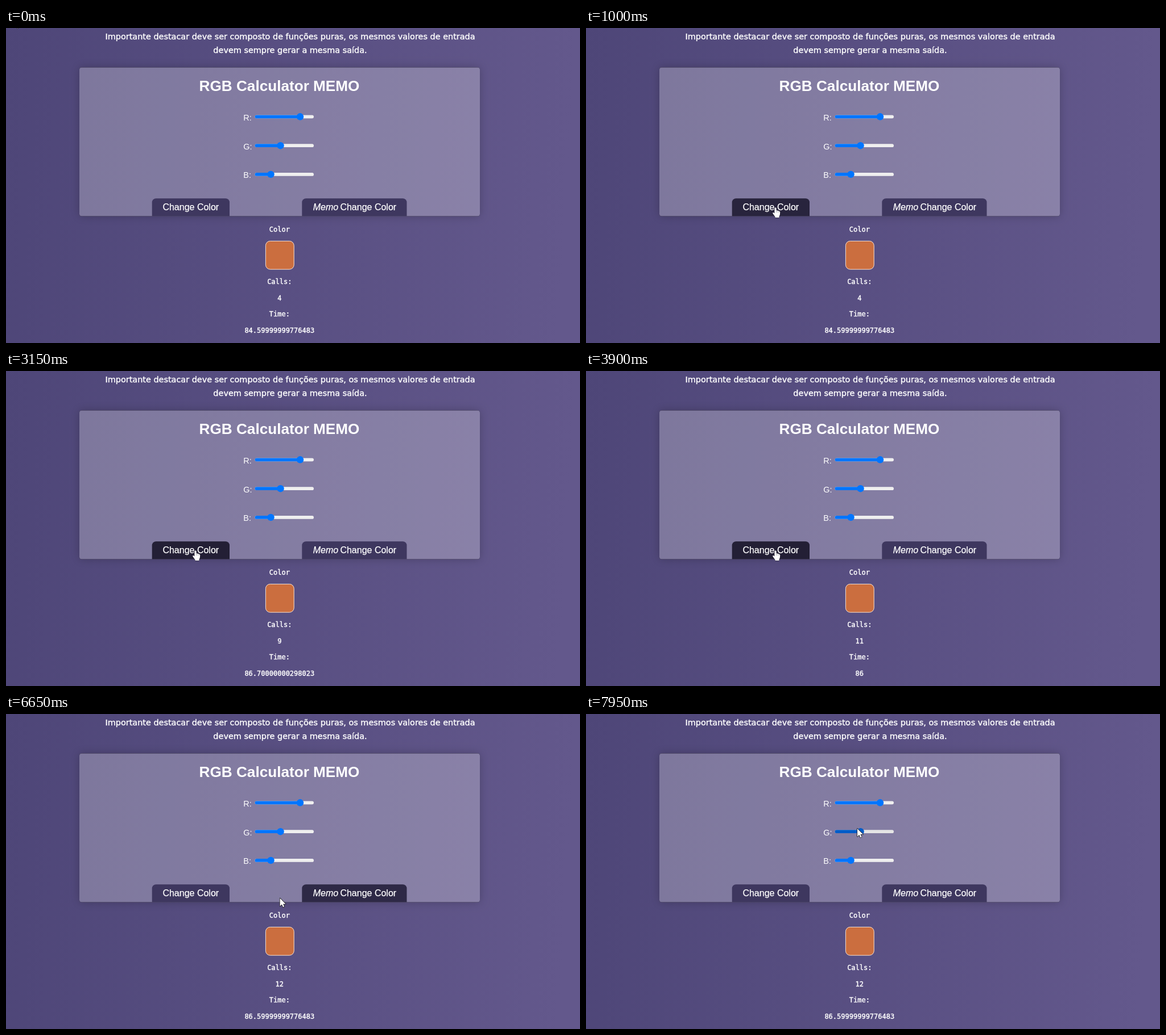
Animation of 1009x555 px, one loop 8 s. Source, as an HTML page with a canvas:

```html
<!DOCTYPE html>
<html lang="pt">
<head>
<meta charset="utf-8">
<title>RGB Calculator MEMO</title>
<style>
  html, body { margin: 0; width: 100%; height: 100%; overflow: hidden; background: #584e82; }
  canvas { display: block; }
</style>
</head>
<body>
<canvas id="stage" width="1009" height="555"></canvas>
<script>
const W = 1009, H = 555, LOOP = 8000, STEP = 50;
const ctx = document.getElementById('stage').getContext('2d');

const SANS = '"Liberation Sans", Arial, sans-serif';
const WIDE = '"DejaVu Sans", Verdana, sans-serif';
const MONO = '"DejaVu Sans Mono", monospace';

// Pointer stops: arrival time, x, y and how long it rests there
const STOPS = [
  { at: 0, x: 14.5, y: -15 },
  { at: 450, x: 452, y: 206 },
  { at: 500, x: 293, y: 245 },
  { at: 850, x: 332, y: 304 },
  { at: 950, x: 333, y: 316, rest: 3175 },
  { at: 4650, x: 582, y: 308, rest: 1775 },
  { at: 6650, x: 481.6, y: 324.6 },
  { at: 6850, x: 350, y: 318, rest: 275 },
  { at: 7350, x: 540, y: 322 },
  { at: 7550, x: 505, y: 347 },
  { at: 7950, x: 477, y: 202 }
];

// Each click adds one call and shows the next elapsed time
const CLICKS = [1500, 2000, 2400, 2700, 3150, 3550, 3900, 4950];
const ELAPSED = ['84.59999999776483', '85.9', '86.5', '85.40000000596046', '87.1',
  '86.70000000298023', '85.90000000596046', '86', '86.59999999776483'];

const BUTTONS = [{ x: 256.7, w: 136.3 }, { x: 520.3, w: 184.2 }];
const SLIDERS = [
  { label: 'R:', y: 156.3, thumb: 517 },
  { label: 'G:', y: 207.2, thumb: 482.5 },
  { label: 'B:', y: 257.9, thumb: 465.5 }
];
const TRACK = { x: 437.5, w: 103.5, h: 5.8 };
const BUTTON_TOP = 300.3, CARD_END = 331.5;

const ARROW = new Path2D('M0 0V14L3.3 10.9L5.4 15.7L7.6 14.7L5.5 10.1H10Z');
const HAND = new Path2D('M-1.6 1.5Q0 -1 1.6 1.5V5.5Q3 4.6 4 6Q5.3 5.2 6.3 6.8Q8 6.3 8.2 8.2' +
  'L8 12Q7.6 14.5 6.5 16V18H-.5V16.5Q-3 13.5 -4.8 10.6Q-5 8.6 -3 9.2L-1.6 10.6Z');

const clamp = v => Math.max(0, Math.min(1, v));
const easeOut = k => 1 - (1 - k) ** 2;
const lerp = (a, b, k) => a + (b - a) * k;
const mix = (a, b, k) => `rgb(${a.map((v, i) => Math.round(lerp(v, b[i], k)))})`;

function pointer(t) {
  const i = STOPS.findLastIndex(s => s.at <= t);
  const a = STOPS[Math.max(0, i)], b = STOPS[i + 1] || a;
  const leave = a.at + (a.rest || 0);
  const k = easeOut(clamp((t - leave) / (b.at - leave || 1)));
  return { x: lerp(a.x, b.x, k), y: lerp(a.y, b.y, k) };
}

// The page reacts to the pointer one step late
const seen = t => pointer(Math.max(0, t - STEP));
const overButton = (p, b) =>
  p.x >= b.x && p.x <= b.x + b.w && p.y >= BUTTON_TOP && p.y <= CARD_END;
const overSlider = (p, s) =>
  p.x >= TRACK.x && p.x <= TRACK.x + TRACK.w && Math.abs(p.y - s.y) < 8;

function hoverAmount(t, button) {
  let k = 0;
  for (let s = 0; s <= t; s += STEP) {
    k = clamp(k + (overButton(seen(s), button) ? .2 : -.2));
  }
  return k;
}

function text(str, x, y, font, { align = 'left', weight = 0 } = {}) {
  ctx.font = font;
  ctx.textAlign = align;
  ctx.fillStyle = ctx.strokeStyle = '#fff';
  ctx.fillText(str, x, y);
  if (weight) {
    ctx.lineWidth = weight;
    ctx.strokeText(str, x, y);
  }
}

function box(x, y, w, h, r, fill) {
  ctx.beginPath();
  ctx.roundRect(x, y, w, h, r);
  ctx.fillStyle = fill;
  ctx.fill();
}

function background() {
  const g = ctx.createLinearGradient(0, 0, 1000, 60);
  g.addColorStop(0, 'rgb(78,70,120)');
  g.addColorStop(1, 'rgb(99,88,140)');
  ctx.fillStyle = g;
  ctx.fillRect(0, 0, W, H);
}

function card() {
  const x = 129, y = 69.6, w = 704, h = CARD_END - y;
  ctx.save();
  ctx.beginPath();
  ctx.rect(0, 0, W, H);
  ctx.roundRect(x, y, w, h, 4);
  ctx.clip('evenodd');
  ctx.shadowColor = 'rgba(0,0,0,.22)';
  ctx.shadowBlur = 16;
  box(x, y, w, h, 4, '#000');
  ctx.restore();
  box(x, y, w, h, 4, 'rgba(255,255,255,.26)');
}

function slider(s, p) {
  const { x, w, h } = TRACK, r = h / 2, top = s.y - r;
  const hot = overSlider(p, s);
  const thumbHot = hot && Math.abs(p.x - s.thumb) < 8;
  const blue = on => on ? '#005cc8' : '#0075ff';
  text(s.label, 417.3, s.y + 6.5, `14.4px ${SANS}`);
  box(x, top, w, h, r, hot ? '#e5e5e5' : '#efefef');
  box(x, top, s.thumb - x, h, [r, 0, 0, r], blue(hot));
  ctx.beginPath();
  ctx.arc(s.thumb, s.y, 6.2, 0, Math.PI * 2);
  ctx.fillStyle = blue(thumbHot);
  ctx.fill();
}

function buttons(t) {
  for (const b of BUTTONS) {
    const fill = mix([62, 55, 95], [35, 31, 53], hoverAmount(t, b));
    box(b.x, BUTTON_TOP, b.w, CARD_END - BUTTON_TOP, [7, 7, 0, 0], fill);
  }
  const look = { weight: .25 };
  text('Change Color', 275.4, 321, `16px ${SANS}`, look);
  text('Memo', 539.7, 321, `italic 16px ${SANS}`, look);
  text('Change Color', 587.4, 321, `16px ${SANS}`, look);
}

function results(t) {
  const clicks = CLICKS.filter(c => c <= t).length;
  const lines = ['Calls:', String(4 + clicks), 'Time:', ELAPSED[clicks]];
  const line = (str, y) =>
    text(str, 480.8, y, `12px ${MONO}`, { align: 'center', weight: .4 });
  line('Color', 359);
  lines.forEach((str, i) => line(str, 451 + i * 28.7));

  box(456, 375, 50.6, 50.6, 8.5, '#cb6e3f');
  ctx.beginPath();
  ctx.roundRect(456.4, 375.4, 49.8, 49.8, 8);
  ctx.lineWidth = .9;
  ctx.strokeStyle = '#f4ece8';
  ctx.stroke();
}

function cursor(t) {
  const { x, y } = pointer(t);
  const hand = BUTTONS.some(b => overButton(seen(t), b));
  const shape = hand ? HAND : ARROW;
  ctx.save();
  ctx.translate(x, y);
  ctx.lineJoin = 'round';
  ctx.lineWidth = hand ? 1 : 1.4;
  ctx.strokeStyle = hand ? 'rgba(20,16,32,.85)' : '#111';
  ctx.stroke(shape);
  ctx.fillStyle = '#fff';
  ctx.fill(shape);
  if (hand) {
    ctx.lineWidth = .6;
    ctx.strokeStyle = 'rgba(20,16,32,.55)';
    ctx.stroke(new Path2D('M1.6 6V9M4 6.4V9M6.3 7.2V9.2'));
  }
  ctx.restore();
}

function draw(t) {
  background();
  const intro = { align: 'center', weight: .4 };
  text('Importante destacar deve ser composto de funções puras, os mesmos valores de entrada',
    499.5, 20, `14.43px ${WIDE}`, intro);
  text('devem sempre gerar a mesma saída.', 499.5, 44, `14.43px ${WIDE}`, intro);

  card();
  text('RGB Calculator MEMO', 480.5, 111, `bold 26.15px ${SANS}`, { align: 'center' });
  SLIDERS.forEach(s => slider(s, seen(t)));
  buttons(t);
  results(t);
  cursor(t);
}

const start = performance.now();
function tick() {
  const t = Math.max(0, performance.now() - start) % LOOP;
  draw(Math.floor(t / STEP) * STEP);
  requestAnimationFrame(tick);
}
tick();
</script>
</body>
</html>
```
